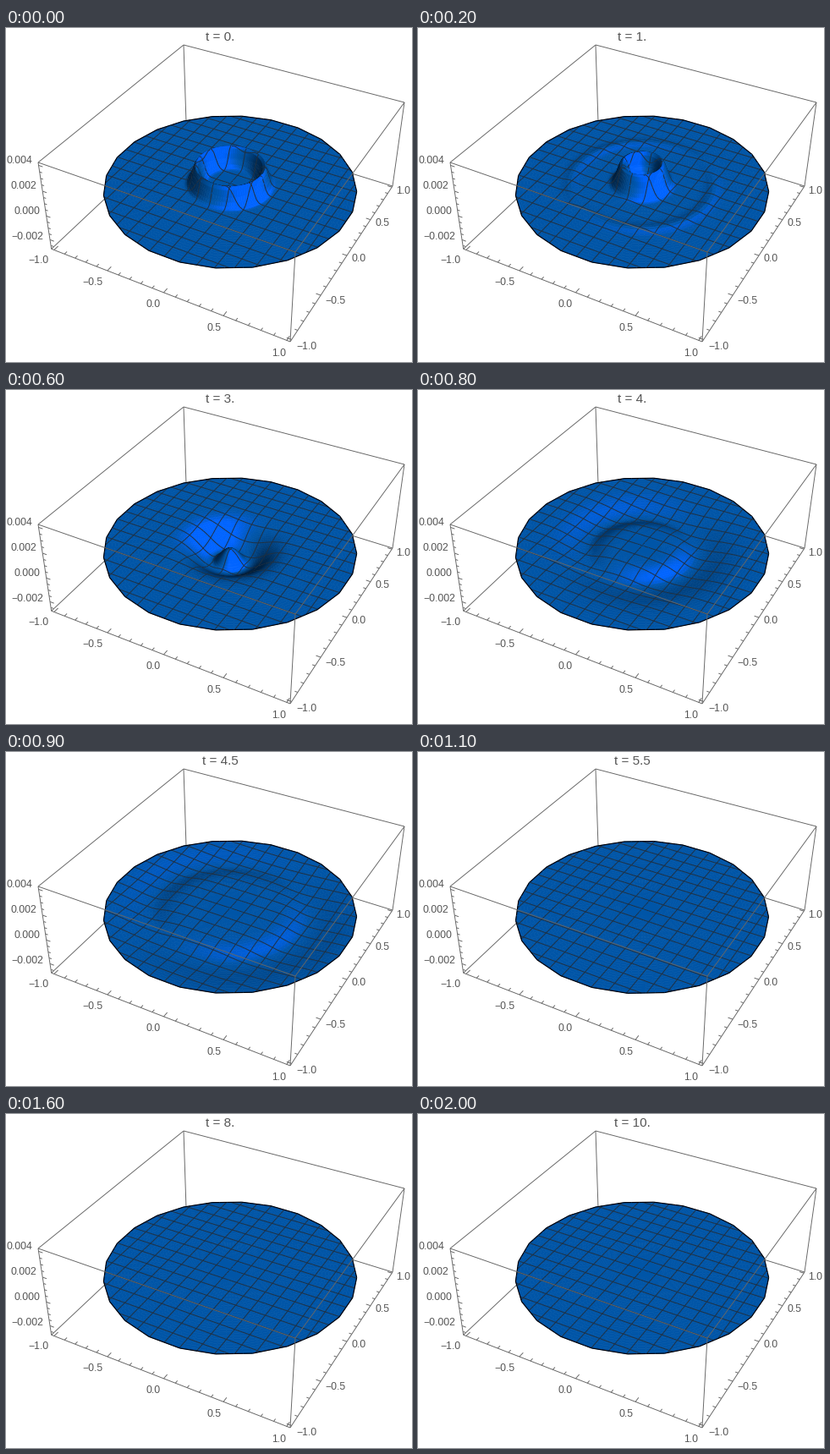
A matplotlib script that plays this animation: 480 px wide and 395 px high, repeating every 2100 ms.

```python
import itertools

import matplotlib.pyplot as plt
import numpy as np
from matplotlib.animation import FuncAnimation
from matplotlib.collections import LineCollection, PolyCollection

W, H, DPI = 480, 395, 100
PX = 72 / DPI
FRAMES, INTERVAL = 21, 100
PAD = 1.026                      # half width of the box
Z_MID, Z_HALF = 0.00072, 0.0035  # height range of the box
Z_SCALE = 119                    # true proportions, used for lighting
SIDES = 24
APOTHEM = np.cos(np.pi / SIDES)

plt.rcParams["font.family"] = "Liberation Sans"

# Screen positions of the box corners, in (x, y, z) product order
CUBE = np.array(list(itertools.product((-1, 1), repeat=3)), float)
CORNERS = np.array([(53.7, 261.3), (38, 159), (213, 111.5), (210, 20),
                    (336, 371), (342, 265), (457, 187), (471, 88)], float)


def fit_camera():
    rows = []
    for p, (u, v) in zip(CUBE, CORNERS / 400):
        q, o = np.r_[p, 1], np.zeros(4)
        rows += [np.r_[q, o, -u * q], np.r_[o, q, -v * q]]
    cam = np.linalg.svd(np.array(rows))[2][-1].reshape(3, 4)
    return cam / cam[2, 3]


CAMERA = fit_camera()


def project(x, y, z):
    """Screen position and relative depth of points in data units."""
    x, y, z = np.broadcast_arrays(x, y, z)
    p = np.stack([x / PAD, y / PAD, (z - Z_MID) / Z_HALF, np.ones(x.shape)], -1)
    u, v, w = np.moveaxis(p @ CAMERA.T, -1, 0)
    return np.stack([u / w, v / w], -1) * 400, w


# Wave parts: ring radius, height and width at steps of half a time unit
INWARD = dict(start=0,
              radius=[.268, .22, .16, .08, 0, 0],
              height=[.0015, .0016, .0017, .0024, .0035, 0],
              width=[.043, .047, .051, .06, .08, .08])
OUTWARD = dict(start=0,
               radius=[.30, .43, .568, .75, .95, 1.1],
               height=[0, .00014, .00012, .0001, .00008, 0],
               width=[.055, .055, .055, .07, .1, .12])
TROUGH = dict(start=2, tail=1.7,
              radius=[0, .05, .15, .28, .45, .64, .97, 1.3],
              height=[0, -.0022, -.0014, -.0008, -.0005, -.00035, -.0003, 0],
              width=[.08, .1, .1, .11, .125, .14, .2, .2])


def at(t, start, values):
    return np.interp(t, start + 0.5 * np.arange(len(values)), values)


def ring(r, t, start, radius, height, width, tail=1):
    """Circular bump whose outer flank is stretched by tail."""
    c, a, w = (at(t, start, v) for v in (radius, height, width))
    flank = np.where(r > c, w * tail, w)
    bump = np.exp(-((r - c) / flank) ** 2) + np.exp(-((r + c) / w) ** 2)
    return a * bump / (1 + np.exp(-(2 * c / w) ** 2))


def surface(r, t):
    level = at(t, 4, [0, -.00004, -.00006, -.0001, -.00004, 0])
    return level + sum(ring(r, t, **part) for part in (INWARD, OUTWARD, TROUGH))


def unit(*v):
    return np.array(v) / np.linalg.norm(v)


AMBIENT = 0.28
LIGHTS = [(0.46, unit(1, -.3, .75)), (0.26, unit(.4, -.9, .9))]
DARK, FLAT, BRIGHT = np.array([(0, 0, 0), (0, 85, 167), (0, 100, 255)]) / 255


def shade(x, y, t):
    r = np.hypot(x, y)
    e = 0.002
    slope = Z_SCALE * (surface(r + e, t) - surface(r - e, t)) / (2 * e)
    n = np.stack([-slope * x / r, -slope * y / r, np.ones_like(r)], -1)
    n /= np.linalg.norm(n, axis=-1, keepdims=True)
    k = AMBIENT + sum(g * np.clip(n @ d, 0, None) / d[2] for g, d in LIGHTS)
    k = k[:, None]
    low = DARK + (FLAT - DARK) * np.minimum(k, 1)
    return low + (BRIGHT - FLAT) * np.clip((k - 1) / 0.26, 0, 1) ** 1.5


def disc_faces():
    s = np.r_[np.linspace(0, .4, 29), np.linspace(.4, 1, 23)[1:]]
    a = np.linspace(0, 2 * np.pi, 4 * SIDES + 1) + np.pi / SIDES
    step = 2 * np.pi / SIDES
    edge = APOTHEM / np.cos(a - step * np.round(a / step))
    # pull the rings towards the polygon only near the rim
    r = s[:, None] * (1 + (edge - 1) * s[:, None] ** 2)
    x, y = r * np.cos(a), r * np.sin(a)

    def quads(g):
        return np.stack([g[:-1, :-1], g[1:, :-1], g[1:, 1:], g[:-1, 1:]],
                        -1).reshape(-1, 4)
    return quads(x), quads(y)


def as_quads(p):
    """Line pieces as flat quads so they sort together with the faces."""
    return np.stack([p[:-1], p[1:], p[1:], p[:-1]], -1)


def mesh_lines():
    al = 2 * np.pi * np.arange(SIDES) / SIDES
    al = al[np.cos(al) > 0.01]
    xs, ys = [], []
    for c in np.arange(-7, 8) / 8:
        m = np.min((APOTHEM - c * np.sin(al)) / np.cos(al))
        run = as_quads(np.linspace(-m, m, int(m / 0.01) + 2))
        fix = np.full_like(run, c)
        xs += [run, fix]
        ys += [fix, run]
    return np.concatenate(xs), np.concatenate(ys)


def rim_lines():
    a = 2 * np.pi * (np.arange(SIDES + 1) + 0.5) / SIDES
    k = np.linspace(0, SIDES, 4 * SIDES + 1)
    return tuple(as_quads(np.interp(k, np.arange(SIDES + 1), f(a)))
                 for f in (np.cos, np.sin))


FACES, MESH, RIM = disc_faces(), mesh_lines(), rim_lines()
X, Y = (np.concatenate(g) for g in zip(FACES, MESH, RIM))
R = np.hypot(X, Y)
N_FACE, N_MESH, N_RIM = (len(g[0]) for g in (FACES, MESH, RIM))
FX, FY = FACES[0].mean(1), FACES[1].mean(1)
BIAS = 0.0012 + 0.004 * R.mean(1)
BIAS[:N_FACE] = 0
BIAS[-N_RIM:] += 0.002
LINE_RGB = np.repeat([(.13, .19, .25), (0, 0, .02)], [N_MESH, N_RIM], axis=0)
WIDTHS = np.repeat([0.6, 1.0, 1.2], [N_FACE, N_MESH, N_RIM]) * PX

fig = plt.figure(figsize=(W / DPI, H / DPI), dpi=DPI, facecolor="white")
ax = fig.add_axes([0, 0, 1, 1])
ax.set_xlim(0, W)
ax.set_ylim(H, 0)
ax.axis("off")


def add_lines(segments, zorder):
    ax.add_collection(LineCollection(segments, colors="#666666",
                                     linewidths=0.95 * PX, zorder=zorder))


def label(x, y, text, size=12.2):
    return ax.text(x, y, text.replace("-", "\u2212"), fontsize=size * PX,
                   color="#555555", ha="center", va="center_baseline", zorder=4)


def draw_box():
    hidden = 2  # far bottom corner
    for i, j in itertools.combinations(range(8), 2):
        if np.abs(CUBE[i] - CUBE[j]).sum() == 2:
            add_lines([CORNERS[[i, j]]], 0 if hidden in (i, j) else 3)


def draw_ticks():
    low = Z_MID - Z_HALF
    ticks = []

    def tick(p, q):
        ticks.append(project(*np.array([p, q]).T)[0])

    for i in range(-10, 11):
        v, f = i / 10, 1 if i % 5 == 0 else 0.6
        tick((v, -PAD, low), (v, -PAD + .05 * f, low))
        tick((PAD, v, low), (PAD - .037 * f, v, low))
    for i in range(-5, 9):
        z, f = i * 0.0005, 1 if i % 4 == 0 else 0.6
        tick((-PAD, -PAD, z), (-PAD + .037 * f, -PAD, z))
    add_lines(ticks, 3)


def draw_labels():
    x_at = [(38, 273), (102, 299), (174, 325), (246, 354), (323, 384)]
    y_at = [(355, 375), (389, 321), (417, 272), (445, 230), (470, 191)]
    for v, p, q in zip(np.arange(-2, 3) / 2, x_at, y_at):
        label(*p, f"{v:.1f}")
        label(*q, f"{v:.1f}")
    z_at = [(25, 246), (25, 216), (21, 186), (16, 156)]
    for v, p in zip((-.002, 0, .002, .004), z_at):
        label(*p, f"{v:.3f}")


draw_box()
draw_ticks()
draw_labels()
title = label(253, 9.5, "", 15.3)
disc = PolyCollection([], zorder=1, joinstyle="round")
ax.add_collection(disc, autolim=False)


def update(i):
    t = i / 2
    points, depth = project(X, Y, surface(R, t))
    order = np.argsort(BIAS - depth.mean(1), kind="stable")
    colors = np.concatenate([shade(FX, FY, t), LINE_RGB])[order]
    disc.set_verts(points[order])
    disc.set_facecolor(colors)
    disc.set_edgecolor(colors)
    disc.set_linewidth(WIDTHS[order])
    title.set_text(f"t = {t:.1f}" if i % 2 else f"t = {i // 2}.")
    return disc, title


anim = FuncAnimation(fig, update, frames=FRAMES, interval=INTERVAL,
                     repeat=True, repeat_delay=0, blit=False)
plt.show()
```
